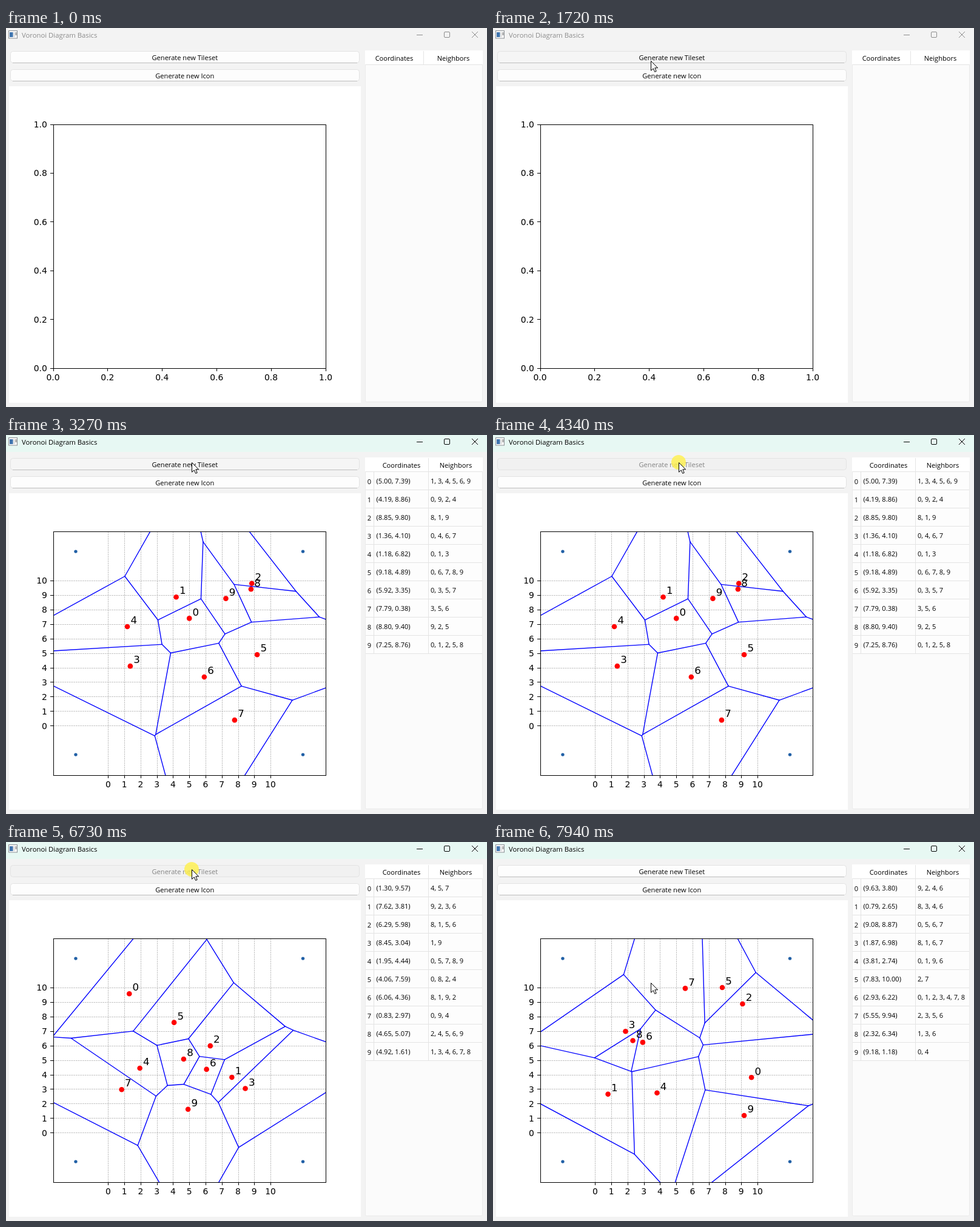
Write an HTML page that moves like this. It is 793 px wide and 625 px high and loops after 8000 ms.

```html
<!DOCTYPE html>
<html lang="en">
<head>
<meta charset="utf-8">
<title>Voronoi Diagram Basics</title>
<style>
  html, body { margin: 0; width: 100%; height: 100%; overflow: hidden; background: #f3f3f3; }
  svg { display: block; width: 793px; height: 625px; }
  text { font: 11.1px "Open Sans", sans-serif; fill: #000; }
  .title { font-size: 11.3px; }
  .tick { font: 13.89px "DejaVu Sans", sans-serif; }
  .tag { font: 16.67px "DejaVu Sans", sans-serif; }
  .mid { text-anchor: middle; }
  .end { text-anchor: end; }
  .axis { fill: none; stroke: #000; stroke-width: 1; }
  .grid { stroke: #b0b0b0; stroke-width: .8; stroke-dasharray: 2.6 1.1; }
  .edge { stroke: #00f; stroke-width: 1.39; stroke-linecap: round; }
  .rule { stroke: #e4e4e4; }
</style>
</head>
<body>
<svg id="stage" viewBox="0 0 793 625"></svg>
<script>
const stage = document.getElementById('stage');
const LOOP = 8000, TICK = 1000 / 15;

function add(parent, tag, attrs = {}, text) {
  const el = document.createElementNS('http://www.w3.org/2000/svg', tag);
  for (const k in attrs) el.setAttribute(k, attrs[k]);
  if (text !== undefined) el.textContent = text;
  parent.appendChild(el);
  return el;
}
const line = (p, cls, x1, y1, x2, y2) => add(p, 'line', { class: cls, x1, y1, x2, y2 });
const label = (p, cls, x, y, s) => add(p, 'text', { class: cls, x, y }, s);
const rect = (p, x, y, width, height, fill, more) => add(p, 'rect', { x, y, width, height, fill, ...more });
const snap = v => Math.floor(v + .5) + .5;

// Plot area in pixels; the data range is -3.4 to 13.4 both ways
const AX = { l: 77.5, r: 527, t: 158.6, b: 560.6 };
const px = v => AX.l + (v + 3.4) * (AX.r - AX.l) / 16.8;
const py = v => AX.b - (v + 3.4) * (AX.b - AX.t) / 16.8;

const CORNERS = [[-2, -2], [-2, 12], [12, -2], [12, 12]];
const SETS = [
  '5.00 7.39,4.19 8.86,8.85 9.80,1.36 4.10,1.18 6.82,9.18 4.89,5.92 3.35,7.79 0.38,8.80 9.40,7.25 8.76',
  '5.17 3.99,9.25 8.66,6.48 7.99,2.57 4.67,6.04 1.32,7.94 5.42,1.15 0.73,9.54 3.30,7.24 8.61,1.87 0.60',
  '1.30 9.57,7.62 3.81,6.29 5.98,8.45 3.04,1.95 4.44,4.06 7.59,6.06 4.36,0.83 2.97,4.65 5.07,4.92 1.61',
  '9.63 3.80,0.79 2.65,9.08 8.87,1.87 6.98,3.81 2.74,7.83 10.00,2.93 6.22,5.55 9.94,2.32 6.34,9.18 1.18'
].map(s => s.split(',').map(p => p.split(' ').map(Number)));

// Voronoi cell of point i: a big box cut by every bisector.
// Each corner keeps the neighbour that owns the side starting there.
function cell(pts, i) {
  const B = 1000, [ax, ay] = pts[i];
  let poly = [[-B, -B], [B, -B], [B, B], [-B, B]].map(([x, y]) => ({ x, y, n: -1 }));
  pts.forEach(([bx, by], n) => {
    if (n === i) return;
    const dx = bx - ax, dy = by - ay;
    const c = (bx * bx + by * by - ax * ax - ay * ay) / 2;
    const side = p => p.x * dx + p.y * dy - c;
    const out = [];
    poly.forEach((p, k) => {
      const q = poly[(k + 1) % poly.length], sp = side(p), sq = side(q);
      if (sp <= 0) out.push(p);
      if ((sp <= 0) !== (sq <= 0)) {
        const f = sp / (sp - sq);
        out.push({ x: p.x + f * (q.x - p.x), y: p.y + f * (q.y - p.y), n: sp <= 0 ? n : p.n });
      }
    });
    poly = out;
  });
  return poly;
}

// Neighbours print in the order of a small hash set with 8 slots
function listed(poly) {
  const ids = [...new Set(poly.map(p => p.n))].filter(n => n >= 0 && n < 10);
  const key = ids.length < 5 ? n => n % 8 : n => n;
  return ids.sort((a, b) => key(a) - key(b) || a - b).join(', ');
}

function frameAxes(g) {
  rect(g, snap(AX.l), snap(AX.t), snap(AX.r) - snap(AX.l), snap(AX.b) - snap(AX.t), 'none', { class: 'axis' });
}
function ticks(g, x, y, s) {
  line(g, 'axis', snap(x), 562, snap(x), 566);
  label(g, 'tick mid', x, 581, s);
  line(g, 'axis', 73, snap(y), 78, snap(y));
  label(g, 'tick end', 67.8, y + 5.4, s);
}

function emptyView() {
  const g = add(stage, 'g');
  for (let i = 0; i <= 5; i++) {
    const f = i / 5;
    ticks(g, AX.l + f * (AX.r - AX.l), AX.b + f * (AX.t - AX.b), f.toFixed(1));
  }
  frameAxes(g);
  line(g, 'rule', 688.5, 38, 688.5, 60);
  label(g, 'mid', 640, 54, 'Coordinates');
  label(g, 'mid', 737.5, 54, 'Neighbors');
  return g;
}

function diagramView(seeds) {
  const g = add(stage, 'g');
  const all = [...seeds, ...CORNERS];
  const cells = all.map((_, i) => cell(all, i));
  for (let v = 0; v <= 10; v++) {
    line(g, 'grid', snap(px(v)), 561, snap(px(v)), 159);
    line(g, 'grid', 78, snap(py(v)), 527, snap(py(v)));
    ticks(g, px(v), py(v), v);
  }
  const inner = add(g, 'g', { 'clip-path': 'url(#axes)' });
  cells.forEach((poly, i) => poly.forEach((p, k) => {
    const q = poly[(k + 1) % poly.length];
    if (p.n > i) line(inner, 'edge', px(p.x), py(p.y), px(q.x), py(q.y));
  }));
  frameAxes(g);
  const dot = ([x, y], r, fill) => add(g, 'circle', { cx: px(x), cy: py(y), r, fill });
  CORNERS.forEach(p => dot(p, 2.7, '#2160a6'));
  seeds.forEach(p => dot(p, 4.3, '#f00'));
  seeds.forEach(([x, y], i) => label(g, 'tag', px(x + .2), py(y + .2), i));

  rect(g, 593, 61, 192, 300, '#fdfdfd');
  label(g, 'mid', 652, 54, 'Coordinates');
  label(g, 'mid', 741.5, 54, 'Neighbors');
  seeds.forEach(([x, y], i) => {
    const base = 80 + 30 * i;
    label(g, 'mid', 599, base + 1, i);
    label(g, '', 610.5, base, `(${x.toFixed(2)}, ${y.toFixed(2)})`);
    label(g, '', 700, base, listed(cells[i]));
    line(g, 'rule', 593, base + 10.5, 785, base + 10.5);
  });
  line(g, 'rule', 606.5, 61, 606.5, 361);
  line(g, 'rule', 696.5, 38, 696.5, 361);
  return g;
}

function button(y, s) {
  const box = rect(stage, 7.5, y + .5, 575, 19, '#fdfdfd', { rx: 4, stroke: '#e3e3e3' });
  const foot = line(stage, '', 11, y + 19.5, 579, y + 19.5);
  foot.setAttribute('stroke', '#bdbdbd');
  const text = label(stage, 'mid', 294.8, y + 15, s);
  return (hover, busy) => {
    box.setAttribute('fill', busy ? '#f1f1f1' : hover ? '#f5f5f5' : '#fdfdfd');
    foot.style.display = busy ? 'none' : '';
    text.style.fill = busy ? '#838383' : '#000';
  };
}

// Window
const clip = add(add(stage, 'defs'), 'clipPath', { id: 'axes' });
rect(clip, 78, 159, 450, 403, '#000');
rect(stage, 0, 0, 793, 625, '#f3f3f3');
const bar = rect(stage, 0, 0, 793, 28, '#f3f3f3');
rect(stage, 4.5, 4.5, 14, 12.5, '#fafafa', { stroke: '#8a8f94' });
rect(stage, 6, 7, 5.5, 8, '#3f74ae');
rect(stage, 12.5, 7, 2, 8, '#dadada');
rect(stage, 15.5, 7, 2, 5, '#9a9a9a');
const title = label(stage, 'title', 26, 16, 'Voronoi Diagram Basics');
const controls = add(stage, 'path', {
  fill: 'none',
  d: 'M677 11.5h10M724 6.5h6q1.5 0 1.5 1.5v6q0 1.5 -1.5 1.5h-6q-1.5 0 -1.5 -1.5v-6q0 -1.5 1.5 -1.5M768 6l10 10M778 6l-10 10'
});
const tileset = button(38, 'Generate new Tileset');
const icon = button(68, 'Generate new Icon');
rect(stage, 5, 96, 580, 522, '#fff');
rect(stage, 592.5, 37.5, 193, 579, '#fbfbfb', { stroke: '#ebebeb', rx: 2 });
rect(stage, 592, 37, 194, 23, '#fff');
line(stage, 'rule', 593, 60.5, 785, 60.5);

const views = [emptyView(), ...SETS.map(diagramView)];
const glow = add(stage, 'circle', { cx: 306, cy: 45, r: 12, fill: '#fff04a', 'fill-opacity': .8 });
const cursor = add(stage, 'path', {
  d: 'M.5 .5V16.2L4.2 12.8L6.7 18.4L9.2 17.3L6.8 11.8H11.6Z',
  fill: '#fff', stroke: '#000', 'stroke-width': 1
});

// Time, x, y of the pointer
const PATH = [
  [660, 554, 576], [930, 455, 235], [1060, 395, 148], [1260, 308, 92], [1460, 246, 58],
  [2330, 306, 41], [2470, 306, 45], [7670, 306, 45], [7940, 260, 232]
];
// Press, redraw, release
const CLICKS = [[3070, 3210, 3270], [4340, 4410, 4470], [5530, 5600, 5660], [6730, 6800, 6870]];
const ACTIVE = 1930;

function pointer(t) {
  const k = PATH.findIndex(p => p[0] > t);
  if (k < 0) return PATH[PATH.length - 1].slice(1);
  const [t0, x0, y0] = PATH[Math.max(k - 1, 0)], [t1, x1, y1] = PATH[k];
  const f = Math.max(0, (t - t0) / (t1 - t0));
  return [Math.round(x0 + f * (x1 - x0)), Math.round(y0 + f * (y1 - y0))];
}

function render(t) {
  const active = t >= ACTIVE, shown = t >= 660;
  const busy = CLICKS.some(c => t >= c[0] && t < c[2]);
  const step = t >= 7940 ? t : Math.floor((t + 7) / TICK) * TICK;
  const [x, y] = pointer(step);
  const over = top => shown && x > 7 && x < 583 && y >= top && y < top + 20;

  bar.setAttribute('fill', active ? '#e7f8f3' : '#f3f3f3');
  title.style.fill = active ? '#000' : '#8c8c8c';
  controls.setAttribute('stroke', active ? '#000' : '#8c8c8c');
  tileset(over(38), busy);
  icon(over(68), false);

  const current = CLICKS.filter(c => t >= c[1]).length;
  views.forEach((v, i) => { v.style.display = i === current ? '' : 'none'; });
  glow.style.display = busy ? '' : 'none';
  cursor.style.display = shown ? '' : 'none';
  cursor.setAttribute('transform', `translate(${x} ${y})`);
}

const start = performance.now();
function loop() {
  render((performance.now() - start) % LOOP);
  requestAnimationFrame(loop);
}
render(0);
requestAnimationFrame(loop);
</script>
</body>
</html>
```
